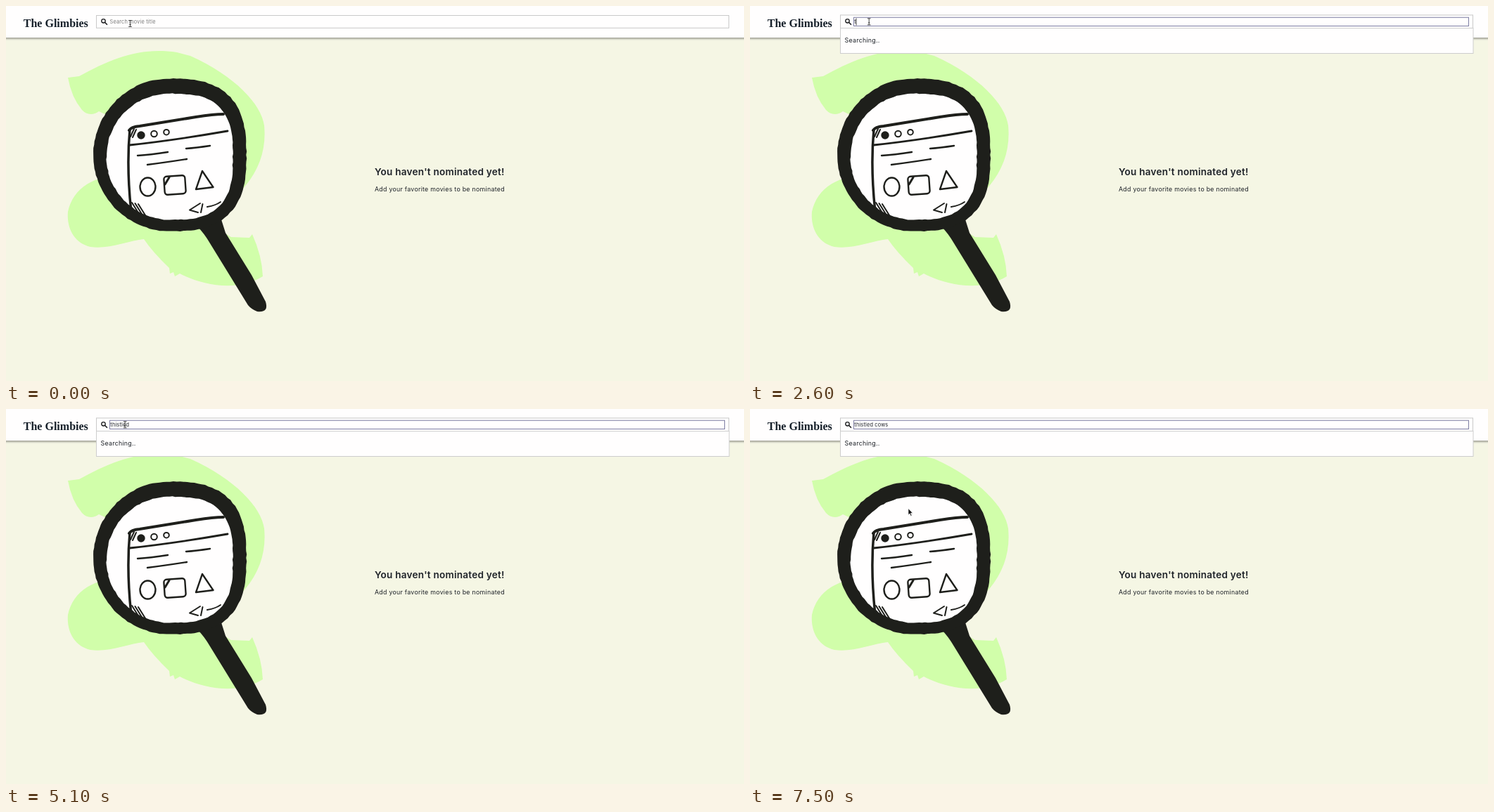
These frames come from a looping animation (1049x534 px, 8000 ms). An HTML page:

```html
<!DOCTYPE html>
<html lang="en">
<head>
<meta charset="utf-8">
<title>Movie search</title>
<style>
  html, body { margin: 0; width: 100%; height: 100%; overflow: hidden; background: #f5f6e4; }
  svg { display: block; width: 100%; height: 100%; }
  text { font-family: Inter, "Open Sans", sans-serif; fill: #1f2329; white-space: pre; }
  .brand { font: bold 16px "Liberation Serif", serif; fill: #17212b; }
  .head { font-size: 13.6px; font-weight: 600; letter-spacing: .22px; }
  .body { font-size: 8.9px; letter-spacing: .24px; }
  .input { font-size: 7.35px; letter-spacing: .18px; }
  .ink { fill: none; stroke: #1e1f1b; stroke-linecap: round; stroke-linejoin: round; }
</style>
</head>
<body>
<svg viewBox="0 0 1049 534">
  <defs>
    <linearGradient id="shade" x2="0" y2="1">
      <stop offset="0" stop-color="#000" stop-opacity=".38"/>
      <stop offset=".4" stop-color="#000" stop-opacity=".2"/>
      <stop offset="1" stop-color="#000" stop-opacity="0"/>
    </linearGradient>
  </defs>
  <rect width="1049" height="534" fill="#f5f6e4"/>

  <g fill="#d1feaa">
    <path d="M88 102Q93 130 108 148C114 155 124 156 132 150L240 200L335 262Q372 222 367 170C363 140 326 100 262 71L243 66C190 58 150 75 104 100Z"/>
    <path d="M132 246C108 254 93 270 88 293C86 318 98 338 120 343C145 347 175 334 196 332Q208 350 232 373L233 381L238 379L240 385L247 381C278 397 328 408 365 385Q364 356 350 325L346 330L320 329L240 280Z"/>
  </g>

  <path fill="#1e1f1b" d="M272 314L306 304L312 323L349 383L369 421Q374 437 357 435Q349 432 344 426L290 338Q282 324 272 314Z"/>
  <path id="rim" fill="#1e1f1b"/>
  <path id="glass" fill="#fffefe"/>

  <g class="ink" stroke-width="2.4">
    <path stroke-width="4" d="M175 177Q178 172 190 171L270 158Q295 154 309 154"/>
    <path stroke-width="3.500" d="M176 176Q171 230 178 293"/>
    <path stroke-width="2.800" d="M176 198Q240 191 315 178"/>
    <circle cx="192" cy="184" r="4.500" fill="#1e1f1b"/>
    <circle cx="210.500" cy="182" r="4.300" stroke-width="2"/>
    <circle cx="228" cy="179.700" r="3.800" stroke-width="2"/>
    <path d="M187 213Q205 212 230 208M256 203Q270 202 290 199M201 226Q225 223 257 218"/>
    <ellipse cx="201.500" cy="257.500" rx="11" ry="13"/>
    <rect x="225" y="242" width="30" height="26" rx="4" transform="rotate(-4 240 255)"/>
    <path stroke-width="3" d="M226 254L232 244"/>
    <path d="M279 235L294.500 258L270 261Z"/>
    <path stroke-width="2" d="M276 281L261 290.500L273 294M279.500 282L277 294M286 286Q298 284 305 279"/>
    <path id="hatch" stroke-width="2"/>
  </g>

  <text class="head" x="524" y="240.700">You haven't nominated yet!</text>
  <text class="body" x="524" y="264">Add your favorite movies to be nominated</text>

  <rect y="45" width="1049" height="4" fill="url(#shade)"/>
  <rect width="1049" height="45" fill="#fffefe"/>
  <text class="brand" x="24.800" y="29.500">The Glimbies</text>

  <rect id="field" x="128.500" width="899" fill="#fffefe" stroke="#c9c9c9"/>
  <g fill="none" stroke="#17181a" stroke-width="1.300">
    <circle cx="138.500" cy="21.300" r="2.700"/>
    <path stroke-width="1.600" d="M140.500 23.300L143.900 26.700"/>
  </g>
  <rect id="focus" x="147.500" y="16.300" width="874" height="12.200" fill="none" stroke="#7d7da3"/>
  <text id="hint" class="input" y="24.600" style="fill:#7b7b7b">Search movie title</text>
  <text id="typed" class="input" x="148.300" y="24.600"></text>
  <path id="caret" stroke="#111" stroke-width=".8" d="M0 17.500V27.500"/>

  <g id="results">
    <rect x="128.500" y="31.500" width="899.500" height="36" fill="#fffefe" stroke="#cdcdcd"/>
    <text class="body" x="134.600" y="52.100">Searching..</text>
  </g>

  <path id="beam" fill="none" stroke="#333" stroke-width=".9" d="M-2.300 -4.500H2.300M0 -4.500V4.500M-2.300 4.500H2.300M-1.200 1.500H1.200"/>
  <path id="arrow" fill="#111" stroke="#fff" stroke-width=".6" d="M0 0V9L2 7.200L3.600 10.700L5 10.100L3.500 6.600H6.300Z"/>
</svg>

<script>
const LOOP = 8000;
const FOCUS = 500;
const QUERY = "thistled cows";
// One press per letter
const PRESSES = [2600, 3200, 3600, 4100, 4500, 4500, 4600, 4900, 5700, 6100, 6300, 6400, 6700];

const $ = id => document.getElementById(id);
const show = (id, on) => $(id).setAttribute("visibility", on ? "visible" : "hidden");
const move = (id, x, y) => $(id).setAttribute("transform", `translate(${x} ${y})`);

let seed = 7;
function random() {
  seed = seed * 16807 % 2147483647;
  return seed / 2147483647;
}

// Brushed circle that swells toward its two right-hand corners
function lens(cx, cy, radius) {
  const steps = 140, pts = [];
  for (let i = 0; i < steps; i++) {
    const a = i / steps * 2 * Math.PI;
    const swell = Math.cos(a) > 0 ? 5 * (1 - Math.cos(4 * a)) : 0;
    const r = radius + swell + random() - 0.5;
    pts.push(`${(cx + r * Math.cos(a)).toFixed(1)} ${(cy + r * Math.sin(a)).toFixed(1)}`);
  }
  return `M${pts.join("L")}Z`;
}

// Parallel strokes, each offset from the last
function hatch(x, y, dx, dy, count, gap) {
  let d = "";
  for (let i = 0; i < count; i++) d += `M${x + i * gap} ${y + i}l${dx} ${dy}`;
  return d;
}

$("rim").setAttribute("d", lens(233, 212, 108.8));
$("glass").setAttribute("d", lens(232.5, 214.5, 89.8));
$("hatch").setAttribute("d", hatch(179, 280, 10, 16, 3, 4.5) + hatch(177, 186, 5, -11, 2, 3));

// The caret goes out on a steady beat and returns with the next press
function caretOn(t, count) {
  const lastOff = Math.floor((t - 300) / 1200) * 1200 + 300;
  const lastInput = count ? PRESSES[count - 1] : FOCUS;
  return t >= FOCUS && lastInput >= lastOff;
}

function drawMouse(t) {
  const typing = t < 5800;
  show("beam", typing);
  show("arrow", !typing);
  if (t < FOCUS) move("beam", 176.5, 25);
  else if (typing) move("beam", 169.2, 22.3);
  else if (t < 6100) move("arrow", 210, 114);
  else move("arrow", 225, 141.7);
}

function draw(t) {
  const count = PRESSES.filter(p => p <= t).length;
  const focused = t >= FOCUS;
  $("field").setAttribute("y", focused ? 12.9 : 13.5);
  $("field").setAttribute("height", focused ? 19 : 17.8);
  show("focus", focused);
  $("hint").setAttribute("x", focused ? 148 : 147.5);
  show("hint", !count);
  show("results", count);

  const typed = $("typed");
  typed.textContent = QUERY.slice(0, count);
  move("caret", 148.4 + (count ? typed.getComputedTextLength() : 0), 0);
  show("caret", caretOn(t, count));
  drawMouse(t);
}

let start;
function tick(now) {
  start ??= now;
  draw((now - start) % LOOP);
  requestAnimationFrame(tick);
}
draw(0);
requestAnimationFrame(tick);
</script>
</body>
</html>
```
